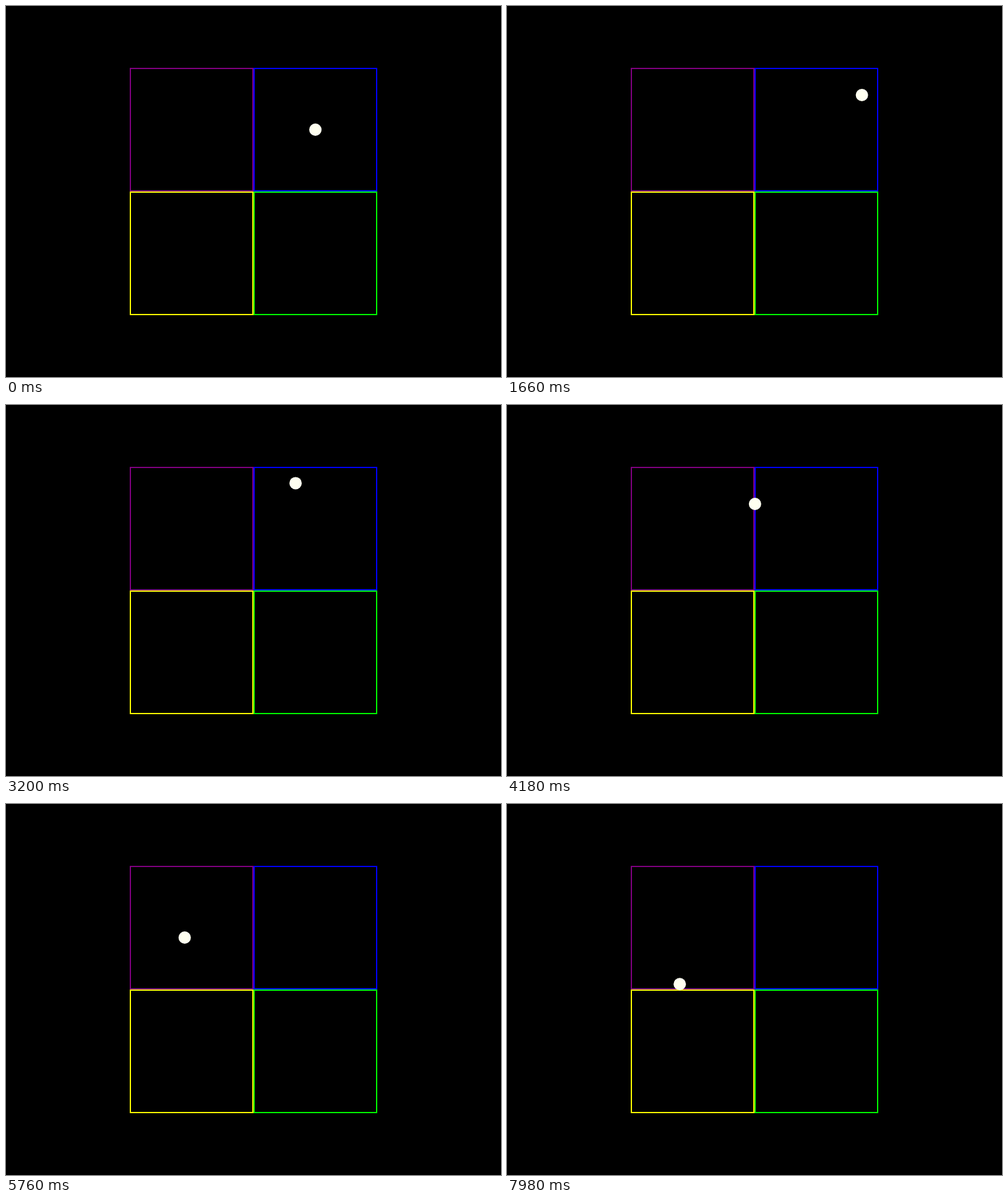
Write an HTML page that moves like this. It is 800 px wide and 600 px high and loops after 8 s.

```html
<!DOCTYPE html>
<html lang="en">
<head>
<meta charset="utf-8">
<title>Bouncing ball</title>
<style>
  html, body { margin: 0; width: 100%; height: 100%; overflow: hidden; background: #000; }
  svg { display: block; }
  rect { fill: none; stroke-width: 2; }
</style>
</head>
<body>
<svg width="800" height="600" viewBox="0 0 800 600">
  <rect x="201" y="101" width="198" height="198" stroke="#800080"/>
  <rect x="401" y="101" width="198" height="198" stroke="#0000ff"/>
  <rect x="201" y="301" width="198" height="198" stroke="#ffff00"/>
  <rect x="401" y="301" width="198" height="198" stroke="#00ff00"/>
  <circle id="ball" cx="500" cy="200" r="10" fill="#fffff0"/>
</svg>
<script>
const LOOP = 8000;
const ball = document.getElementById('ball');
const start = performance.now();

// Steps come in groups of three, held for 20, 20 and 100 ms.
function stepAt(time) {
  const shifted = time + 20;
  const withinGroup = Math.min(2, Math.floor((shifted % 140) / 20));
  return 3 * Math.floor(shifted / 140) + withinGroup;
}

function draw(now) {
  const step = stepAt(Math.max(0, now - start) % LOOP);
  // The ball turns at the right wall on step 30, at the top on 58, at the left on 150.
  const sinceRightWall = (step + 210) % 240;
  ball.setAttribute('cx', 208.8 + 3.2 * Math.abs(120 - sinceRightWall));
  ball.setAttribute('cy', 108.8 + 1.6 * Math.abs(step - 58));
  requestAnimationFrame(draw);
}
requestAnimationFrame(draw);
</script>
</body>
</html>
```
